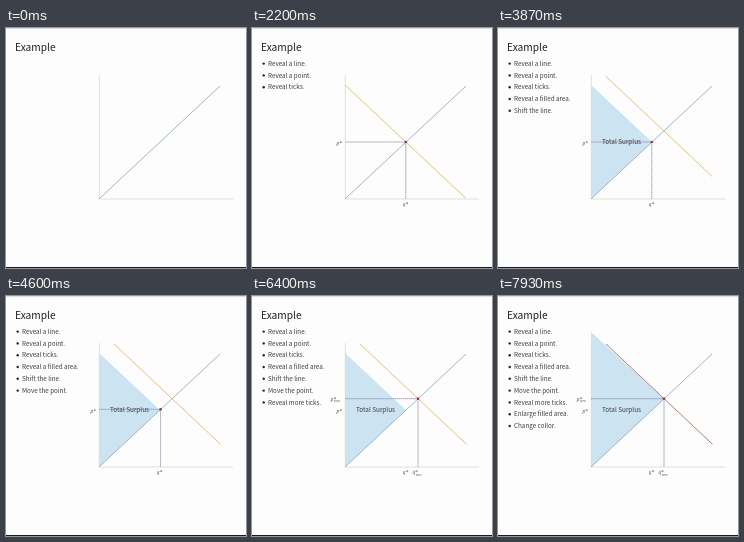
Write an HTML page that moves like this. It is 240x240 px and loops after 8 s.

```html
<!DOCTYPE html>
<html lang="en">
<head>
<meta charset="utf-8">
<title>Example</title>
<style>
  html, body { margin: 0; width: 100%; height: 100%; overflow: hidden; background: #fdfdfd; }
  svg { display: block; width: 100vw; height: 100vh; }
  text { font-family: "Noto Sans CJK SC", "Noto Sans CJK JP", "Noto Sans CJK", "Open Sans", sans-serif; fill: #3a3a3a; }
  .title { font-size: 10.2px; font-weight: 500; fill: #222; }
  .bullet { font-size: 6.3px; }
  .area-label { font-size: 6.4px; font-weight: 500; text-anchor: middle; }
  .tick { font: italic 5.4px "Liberation Serif", "Noto Serif", serif; text-anchor: middle; fill: #555; }
  .tick .sub { font-size: 3.6px; }
  .line { fill: none; stroke-width: .9; }
</style>
</head>
<body>
<svg viewBox="0 0 240 240">
  <rect width="240" height="240" fill="#fdfdfd"/>
  <rect width="240" height="1" fill="#dcdce8"/>
  <rect y="239" width="240" height="1" fill="#181818"/>
  <text class="title" x="9" y="23">Example</text>
  <g id="bullets"></g>

  <polygon id="area" fill="#cce3f2"/>
  <path class="line" d="M93.3 47V171H227" stroke="#deded0"/>
  <path class="line" d="M93 171L214 58" stroke="#94afc4"/>
  <path class="line" id="demand"/>
  <path class="line" id="guides" stroke="#9297ac" stroke-dasharray="1.5 .5"/>
  <circle id="point" r="1.3" fill="#8e3434"/>
  <text class="area-label" id="label" x="123.5" y="116.4">Total Surplus</text>
  <g id="ticks">
    <text class="tick" x="87.3" y="116.5">p*</text>
    <text class="tick" x="153.5" y="178">q*</text>
  </g>
  <g id="newTicks">
    <text class="tick" x="83.3" y="104.5">p*<tspan class="sub" dx="-2" dy="1.5">new</tspan></text>
    <text class="tick" x="165" y="178">q*<tspan class="sub" dx="-2" dy="1.5">new</tspan></text>
  </g>
</svg>
<script>
const LOOP = 8000;
// Each bullet and its start time
const steps = [
  ["Reveal a line.", 300],
  ["Reveal a point.", 1200],
  ["Reveal ticks.", 1650],
  ["Reveal a filled area.", 2300],
  ["Shift the line.", 3050],
  ["Move the point.", 4350],
  ["Reveal more ticks.", 5600],
  ["Enlarge filled area.", 6550],
  ["Change collor.", 7350]
];
const $ = id => document.getElementById(id);
const set = (node, attrs) => {
  for (const name in attrs) node.setAttribute(name, attrs[name]);
  return node;
};
const create = (tag, attrs, parent) =>
  parent.appendChild(set(document.createElementNS("http://www.w3.org/2000/svg", tag), attrs));
const mix = (a, b, p) => a + (b - a) * p;
const ease = p => p < .5 ? 4 * p ** 3 : 1 - 4 * (1 - p) ** 3;

const bullets = steps.map(([text], i) => {
  const group = create("g", {}, $("bullets"));
  const y = 35.6 + i * 11.8;
  create("circle", { cx: 11.7, cy: y, r: 1.2, fill: "#222" }, group);
  create("text", { class: "bullet", x: 16, y: y + 2.2 }, group).textContent = text;
  return group;
});

function draw(time) {
  const progress = (step, duration) =>
    Math.max(0, Math.min(1, (time - steps[step - 1][1]) / duration));

  bullets.forEach((bullet, i) => set(bullet, { opacity: progress(i + 1, 150) }));

  const reveal = ease(progress(1, 600));
  const shifting = progress(5, 1000);
  const shift = ease(shifting);
  const x = 93 + 15 * shift, y = 57 - 9 * shift;
  const width = shifting ? 106.5 : 121 * reveal;
  const height = shifting ? 100.3 : 113.5 * reveal;
  const recolor = progress(9, 450);
  set($("demand"), {
    d: `M${x} ${y}l${width} ${height}`,
    stroke: `rgb(${mix(238, 196, recolor)},${mix(184, 108, recolor)},${mix(104, 78, recolor)})`,
    opacity: reveal ? 1 : 0
  });

  const move = ease(progress(6, 1000));
  const px = mix(153.8, 166, move), py = mix(114, 102.7, move);
  set($("point"), { cx: px, cy: py, opacity: progress(2, 300) });
  const ticks = progress(3, 400);
  set($("guides"), { d: `M${px} ${py}H93M${px} ${py}V171`, opacity: ticks });
  set($("ticks"), { opacity: ticks });
  set($("newTicks"), { opacity: progress(7, 400) });

  const fill = progress(4, 400);
  const enlarge = ease(progress(8, 700));
  set($("area"), {
    points: `93,${mix(57, 36, enlarge)} ${mix(153.8, 166, enlarge)},${mix(114, 102.7, enlarge)} 93,171`,
    opacity: fill
  });
  set($("label"), { opacity: fill });
}

const start = performance.now();
function frame() {
  draw((performance.now() - start) % LOOP);
  requestAnimationFrame(frame);
}
frame();
</script>
</body>
</html>
```
